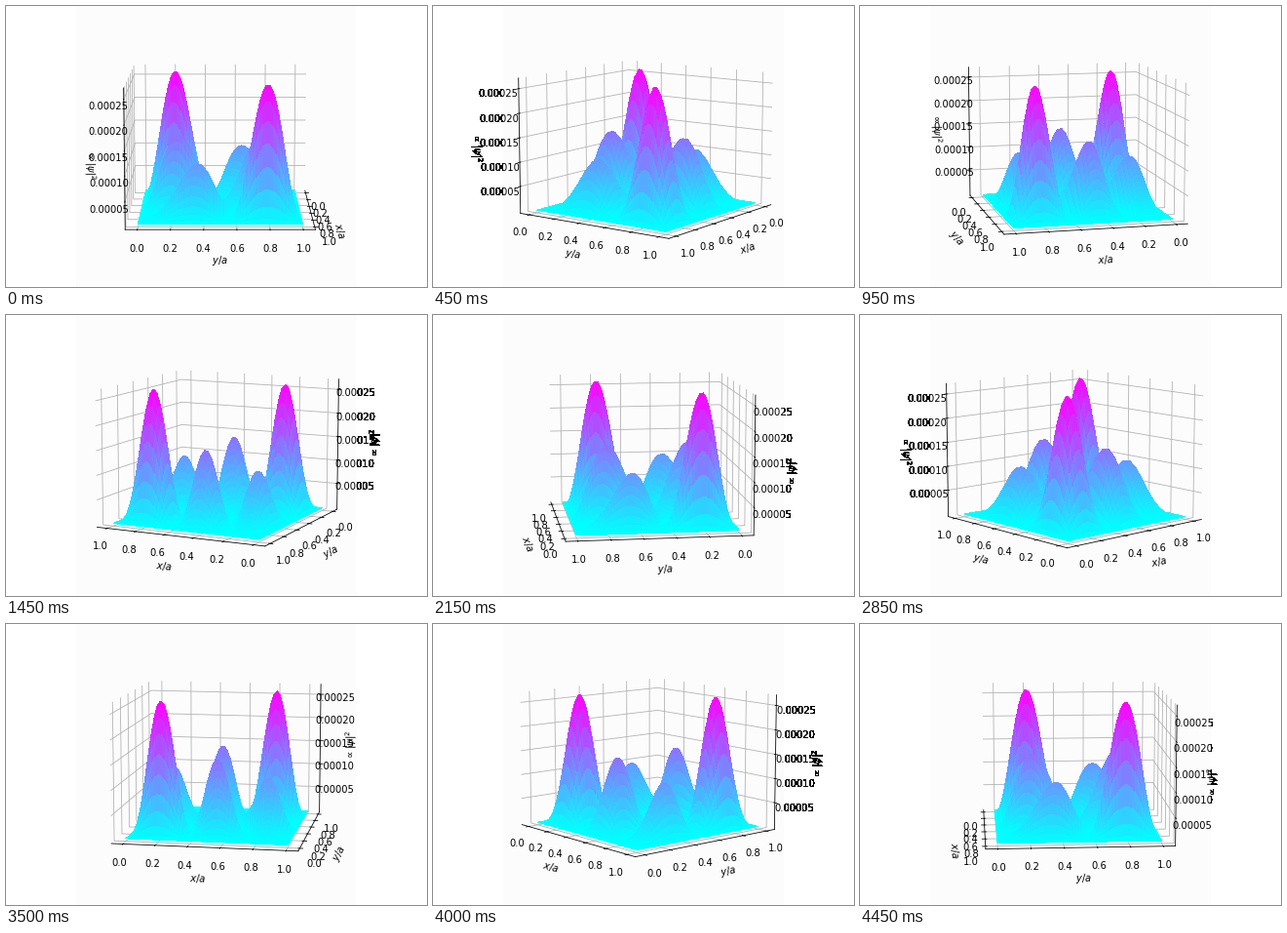
Animation, 432 px wide and 288 px high, one loop 4.5 s. Source, as a matplotlib script:

```python
import numpy as np
import matplotlib.pyplot as plt
from matplotlib.animation import FuncAnimation

WIDTH, HEIGHT, DPI = 432, 288, 72
FRAMES, INTERVAL = 90, 50
ELEVATION = 10
PEAK = 2.66e-4
MARGIN = 1 / 48


def padded(low, high):
    pad = (high - low) * MARGIN
    return low - pad, high + pad


def mode(n, s):
    return np.sin(n * np.pi * s)


def density(x, y):
    """Particle in a square box: a 2:1 mix of the (3,2) and (2,3) states."""
    psi = 2 * mode(3, x) * mode(2, y) + mode(2, x) * mode(3, y)
    return PEAK * psi**2 / np.max(psi**2)


def harden_outside(image, dpi):
    """Outside the opaque square, soft text edges become solid pixels."""
    result = image.copy()
    outside = image[0, :, 3] == 0
    result[:, outside, 3] = image[:, outside, 3] > 0.1
    return result, 0, 0


fig = plt.figure(figsize=(WIDTH / DPI, HEIGHT / DPI), dpi=DPI, facecolor="white")
ax = fig.add_axes([0, 0, 1, 1], projection="3d")
ax.set_facecolor("#fcfcfc")
ax.set_agg_filter(harden_outside)

side = np.linspace(0, 1, 51)
x, y = np.meshgrid(side, side)
ax.plot_surface(x, y, density(x, y), rstride=1, cstride=1, cmap="cool",
                linewidth=0, antialiased=False)

ax.set_xlim(padded(-0.05, 1.05))
ax.set_ylim(padded(-0.05, 1.05))
ax.set_zlim(padded(0, PEAK))

unit_ticks = np.arange(6) / 5
ax.set_xticks(unit_ticks)
ax.set_yticks(unit_ticks)
z_ticks = np.arange(1, 6) * 5e-5
ax.set_zticks(z_ticks, [f"{t:.5f}" for t in z_ticks])

ax.set_xlabel("$x/a$")
ax.set_ylabel("$y/a$")
ax.set_zlabel(r"$\propto|\psi|^2$")
for axis in (ax.xaxis, ax.yaxis, ax.zaxis):
    axis.set_pane_color((1, 1, 1, 0))


def update(frame):
    # The tiny offset keeps the axis placement stable at right angles.
    ax.view_init(elev=ELEVATION, azim=360 * frame / FRAMES + 1e-3)
    return []


anim = FuncAnimation(fig, update, frames=FRAMES, interval=INTERVAL,
                     init_func=lambda: update(0), repeat=True, repeat_delay=0)
plt.show()
```
